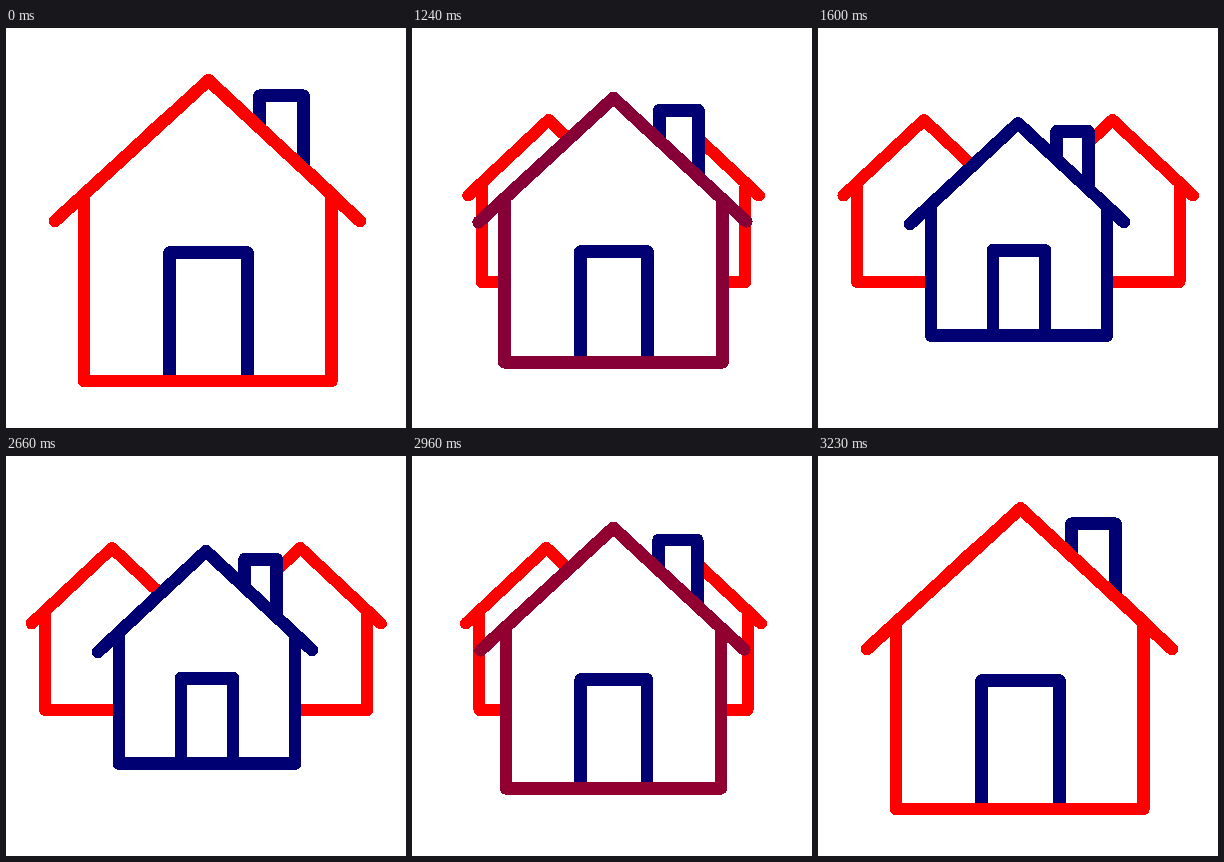
These frames come from a looping animation (400 px wide and 400 px high, 3260 ms). An HTML page:

```html
<!DOCTYPE html>
<html lang="en">
<head>
<meta charset="utf-8">
<title>Houses</title>
<style>
  html, body { margin: 0; width: 100%; height: 100%; overflow: hidden; background: #fff; }
  svg { display: block; width: 100vw; height: 100vh; shape-rendering: crispEdges; }
  path { fill: none; stroke-width: 12.6; stroke-linecap: round; stroke-linejoin: round; }
  .side path { stroke: #f00; stroke-width: 12; }
  .navy { stroke: #000073; }
  .filled { fill: #fff; }
  #wall { stroke: none; fill: #fff; }
</style>
</head>
<body>
<svg viewBox="0 0 400 400">
  <g class="side" id="left">
    <path d="M39 158V254H172V158"/>
    <path d="M25.5 167.5L106 92L186 167.5"/>
  </g>
  <g class="side" id="right">
    <path d="M229 158V254H361.5V158"/>
    <path d="M214 167.5L294.5 92L375 167.5"/>
  </g>
  <path id="chimney" class="navy filled"/>
  <path id="wall"/>
  <path id="door" class="navy"/>
  <path id="body"/>
  <path id="roof"/>
</svg>
<script>
const LOOP = 3260, STEP = 30, OFFSET = 10;
const RED = [255, 0, 0], NAVY = [0, 0, 115];

// Each entry: [large house, small house]
const shape = {
  eaveL: [49, 92], eaveLY: [193, 196],
  apex: [202.5, 200], apexY: [52.3, 95.3],
  eaveR: [354, 306], eaveRY: [193, 194],
  wallL: [78, 113], wallR: [325.5, 289], floor: [353, 307.5],
  doorL: [163.5, 175], doorR: [241.5, 227], doorY: [224.5, 222.3],
  chimL: [253.5, 238.5], chimR: [297.5, 270.5], chimY: [67.7, 103.3]
};

const $ = id => document.getElementById(id);
const mix = (a, b, p) => a + (b - a) * p;
const ease = (t, start, length) => {
  const u = Math.min(1, Math.max(0, (t - start) / length));
  return u * u * (3 - 2 * u);
};
const setPath = (id, d) => $(id).setAttribute('d', d);

function draw(time) {
  const t = Math.floor((time - OFFSET) / STEP) * STEP + OFFSET;
  const p = ease(t, 985, 580) - ease(t, 2633, 597);
  const tint = ease(t, 1010, 475) - ease(t, 2633, 580);

  const s = {};
  for (const key in shape) s[key] = mix(...shape[key], p);
  const roofL = x => mix(s.apexY, s.eaveLY, (s.apex - x) / (s.apex - s.eaveL));
  const roofR = x => mix(s.apexY, s.eaveRY, (x - s.apex) / (s.eaveR - s.apex));

  const frame = `M${s.wallL} ${roofL(s.wallL) + 2}V${s.floor}H${s.wallR}V${roofR(s.wallR) + 2}`;
  setPath('body', frame);
  setPath('wall', `${frame}L${s.apex} ${s.apexY}Z`);
  setPath('roof', `M${s.eaveL} ${s.eaveLY}L${s.apex} ${s.apexY}L${s.eaveR} ${s.eaveRY}`);
  setPath('door', `M${s.doorL} ${s.floor - 3}V${s.doorY}H${s.doorR}V${s.floor - 3}`);
  setPath('chimney', `M${s.chimL} ${roofR(s.chimL)}V${s.chimY}H${s.chimR}V${roofR(s.chimR)}`);

  const color = `rgb(${RED.map((c, i) => Math.round(mix(c, NAVY[i], tint)))})`;
  $('body').style.stroke = $('roof').style.stroke = color;

  $('left').setAttribute('transform', `translate(${52 * (1 - p)} 0)`);
  $('right').setAttribute('transform', `translate(${-47.5 * (1 - p)} 0)`);
}

const origin = performance.now();
function tick() {
  draw((performance.now() - origin) % LOOP);
  requestAnimationFrame(tick);
}
tick();
</script>
</body>
</html>
```
